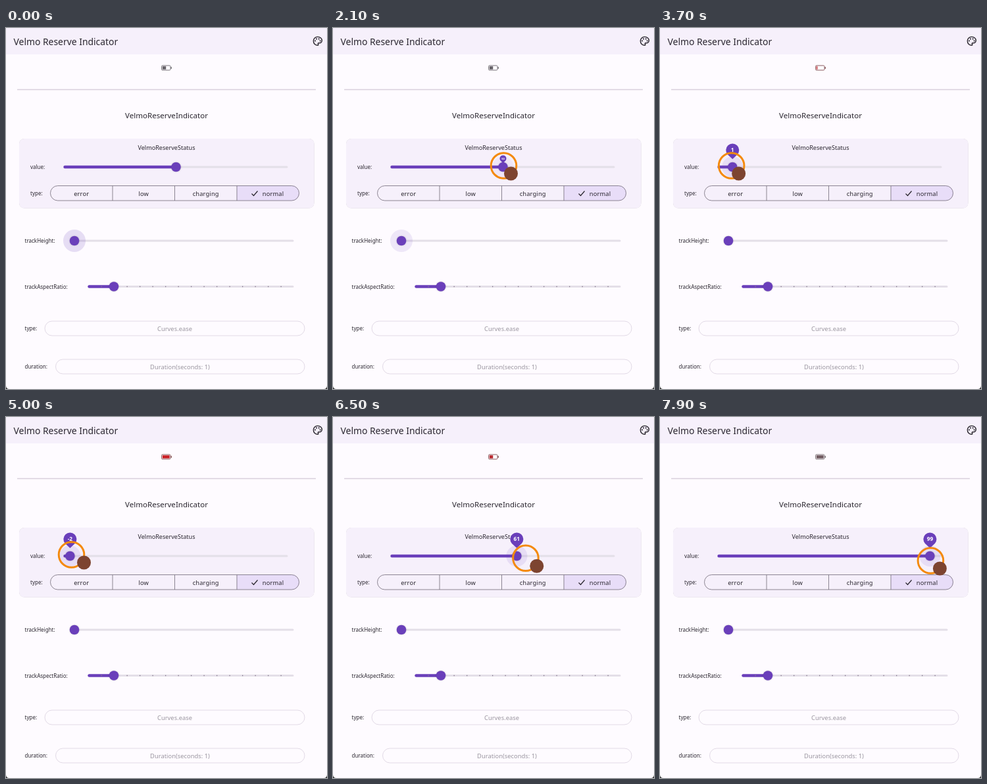
Animation of 488x548 px, one loop 8 s. Source, as an HTML page:

```html
<!DOCTYPE html>
<html lang="en">
<head>
<meta charset="utf-8">
<title>Reserve indicator</title>
<style>
  html, body { margin: 0; width: 100%; height: 100%; overflow: hidden; background: #2b2b2b; }
  svg { display: block; width: 488px; height: 548px; }
  text { font-family: "Noto Sans", "Open Sans", sans-serif; fill: #2b2730; }
  .mid { text-anchor: middle; }
  .label { font-size: 8px; font-weight: 500; }
  .seg { font-size: 9.3px; font-weight: 500; letter-spacing: .15px; }
  .hint { font-size: 9.4px; fill: #9b96a0; }
  .rail { stroke: #e4dfe8; stroke-width: 3; stroke-linecap: round; }
  .done { stroke: #6a3fba; stroke-width: 4.4; stroke-linecap: round; }
  .knob { fill: #6a3fba; filter: drop-shadow(0 .7px .8px #0003); }
  .halo { fill: #6a3fba; }
  .line { fill: none; stroke: #716a78; stroke-width: .8; }
  .field { fill: none; stroke: #e2dae6; }
</style>
</head>
<body>
<svg viewBox="0 0 488 548">
  <path d="M0 0H488V543Q488 548 483 548H5Q0 548 0 543Z" fill="#fefbff"/>
  <rect width="488" height="40" fill="#f6f0fb"/>
  <text x="11.5" y="26" font-size="13.9">Velmo Reserve Indicator</text>
  <g transform="translate(465.2 11.2) scale(.72)" fill="#2a262e">
    <path d="M12 21A9 9 0 1 1 12 3C17 3 21 6.6 21 11A5 5 0 0 1 16 16H14.2A1.5 1.5 0 0 0 13 18.5C14 19.6 13.3 21 12 21Z" fill="none" stroke="#2a262e" stroke-width="2"/>
    <circle cx="6.7" cy="11.5" r="1.5"/><circle cx="9.5" cy="7.5" r="1.5"/>
    <circle cx="14.5" cy="7.5" r="1.5"/><circle cx="17.3" cy="11.5" r="1.5"/>
  </g>

  <rect id="shell" x="236.5" y="57" width="13.5" height="7" rx="1.5" fill="none" stroke-width=".9"/>
  <rect id="tip" x="250.5" y="59" width="1.3" height="3"/>
  <rect id="charge" x="237.8" y="58.2" height="4.6"/>

  <path d="M17 93.5H471" stroke="#d8d0dc" stroke-width="1.3"/>
  <text class="mid" x="244" y="136.5" font-size="11.55">VelmoReserveIndicator</text>

  <rect x="20" y="168" width="448.5" height="105.5" rx="8" fill="#f6f0fb" style="filter:drop-shadow(0 .7px .6px #0003)"/>
  <text class="mid" x="244" y="185.3" font-size="9.1">VelmoReserveStatus</text>

  <text class="label" x="37" y="214">value:</text>
  <path class="rail" d="M89 211H427"/>
  <path class="done" id="fill"/>

  <text class="label" x="37" y="254">type:</text>
  <path d="M351 239.5H434.5A11 11 0 0 1 434.5 262H351Z" fill="#e8ddf8"/>
  <rect class="line" x="67.5" y="239.5" width="378" height="22.5" rx="11.2"/>
  <g id="types"></g>
  <path d="M373.5 251.5L376.5 254.5L382.5 247.5" fill="none" stroke="#2a262e" stroke-width="1.2"/>

  <text class="label" x="28.5" y="326.3">trackHeight:</text>
  <path class="rail" d="M105 323H436"/>
  <circle class="halo" id="focus" cx="104" cy="323" r="17"/>
  <circle class="knob" cx="104" cy="323" r="7.3"/>

  <text class="label" x="28.5" y="396">trackAspectRatio:</text>
  <path class="rail" d="M126 392.5H436"/>
  <path class="done" d="M126.5 392.5H164"/>
  <path d="M144.5 392.5H437" stroke="#857b8e" stroke-width="1.3" stroke-dasharray="1.3 18.2"/>
  <circle class="knob" cx="164" cy="392.5" r="7.3"/>

  <text class="label" x="28.5" y="459">type:</text>
  <rect class="field" x="59" y="445" width="395" height="22" rx="11"/>
  <text class="hint mid" x="256.5" y="460">Curves.ease</text>

  <text class="label" x="28.5" y="517">duration:</text>
  <rect class="field" x="75.5" y="503" width="378.5" height="22" rx="11"/>
  <text class="hint mid" x="264.5" y="518">Duration(seconds: 1)</text>

  <g id="thumb">
    <circle class="halo" id="press" r="16"/>
    <g id="pin">
      <path d="M0 -12L-7.5 -19A10 10 0 1 1 7.5 -19Z" fill="#6a3fba"/>
      <text class="mid" id="num" y="-22.8" font-size="8.3" font-weight="600" style="fill:#fff"></text>
    </g>
    <circle class="knob" r="7.3"/>
  </g>
  <circle id="ring" r="19.3" fill="none" stroke="#f48a0c" stroke-width="3"/>
  <circle id="cursor" r="10.5" fill="#7d4430"/>
</svg>
<script>
  const LOOP = 8000, STEP = 100, LAG = 75, PRESS = 2100;
  const $ = id => document.getElementById(id);
  const set = (id, attrs) => { for (const k in attrs) $(id).setAttribute(k, attrs[k]); };

  const ramp = (t, from, to) => Math.min(1, Math.max(0, (t - from) / (to - from)));
  const ease = (t, from, to) => { const p = ramp(t, from, to); return p * p * (3 - 2 * p); };
  const easeOut = (t, from, to) => 1 - (1 - ramp(t, from, to)) ** 2.5;
  const curve = (a, b, c, p) => (1 - p) ** 2 * a + 2 * p * (1 - p) * b + p * p * c;
  const blend = (a, b, p) => `rgb(${a.map((c, i) => Math.round(c + (b[i] - c) * p))})`;

  // Dragged down below zero, then up to nearly full
  const value = t => 50 - 52 * easeOut(t, PRESS, 4500) + 101 * ease(t, 4900, 7650);
  const sliderX = v => 88 + 3.1 * (v + 5);

  const level = t => .5 - .38 * ease(t, 2300, 3900) + .88 * ease(t, 3900, 4600)
    - .5 * ease(t, 5000, 6000) + .5 * ease(t, 6800, 7900);
  const alarm = t => ease(t, 2900, 3900) - .9 * ease(t, 6000, 8000);

  function pointer(t) {
    const p = easeOut(t, 100, 900), settle = ease(t, 900, 1600);
    return [curve(112, 676, 260, p) + 10 * settle, curve(318, 262, 217, p) + 4 * settle];
  }

  function draw(t) {
    const v = value(t), x = sliderX(value(t - LAG));
    const down = t >= PRESS, pop = ramp(t, 2000, 2200);

    set("fill", { d: `M89.5 211H${x}` });
    set("thumb", { transform: `translate(${x} 211)` });
    set("press", { opacity: .11 * pop });
    set("pin", { transform: `scale(${pop})` });
    $("num").textContent = Math.round(v);
    set("focus", { opacity: .16 * (1 - ramp(t, 2000, 2300)) });

    const rx = sliderX(v) + 1, ry = 209 + 9 * ease(t, 6000, 6900);
    set("ring", { cx: rx, cy: ry, visibility: down ? "visible" : "hidden" });
    const reach = 11 + 8 * ease(t, 4400, 5000) - 5 * ease(t, 6000, 7100);
    const [cx, cy] = down ? [rx + reach, ry + 12] : pointer(t);
    set("cursor", { cx, cy, visibility: t >= 100 ? "visible" : "hidden" });

    const red = alarm(t), edge = blend([104, 100, 106], [128, 70, 72], red);
    set("shell", { stroke: edge });
    set("tip", { fill: edge });
    set("charge", { width: 10.9 * level(t), fill: blend([100, 96, 102], [200, 30, 36], red) });
  }

  $("types").innerHTML = ["error", "low", "charging", "normal"].map((name, i) => {
    const left = 67.5 + 94.5 * i, last = i === 3;
    return `<text class="seg mid" x="${left + (last ? 55 : 47.2)}" y="254.5">${name}</text>` +
      (last ? "" : `<path class="line" d="M${left + 94.5} 239.5V262"/>`);
  }).join("");

  const start = performance.now();
  function tick() {
    const t = (performance.now() - start) % LOOP;
    draw(Math.floor(t / STEP) * STEP);
    requestAnimationFrame(tick);
  }
  tick();
</script>
</body>
</html>
```
